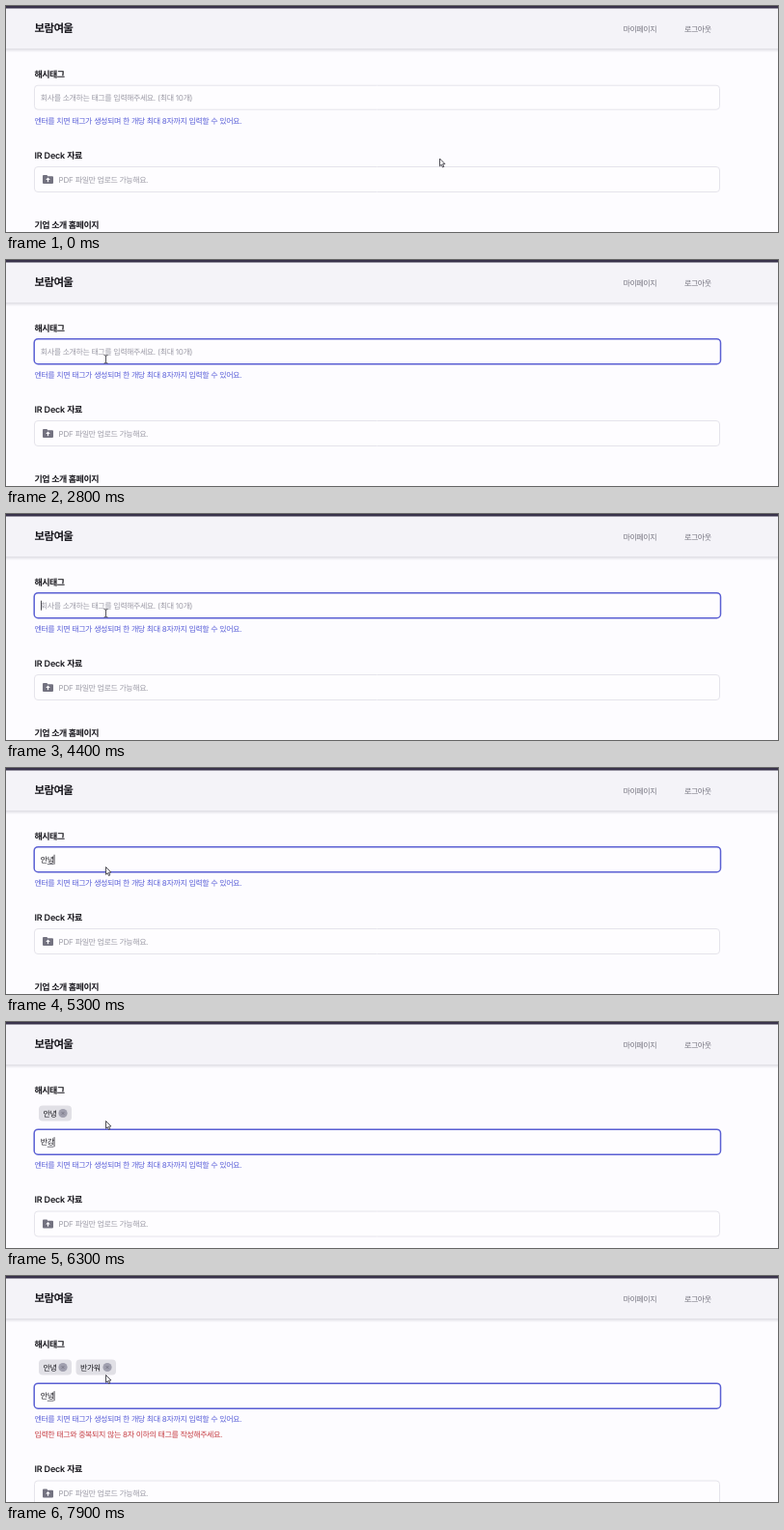
These frames come from a looping animation (800x234 px, 8000 ms). An HTML page with a canvas:

```html
<!DOCTYPE html>
<html lang="ko">
<head>
<meta charset="utf-8">
<style>
html, body { margin: 0; width: 100%; height: 100%; overflow: hidden; background: #fdfcff; }
canvas { display: block; width: 800px; height: 234px; }
</style>
</head>
<body>
<canvas id="stage" width="800" height="234"></canvas>
<script>
const ctx = document.getElementById('stage').getContext('2d');
const LOOP = 8000, STEP = 100;
const FONT = 'Inter, "Noto Sans CJK KR", "Noto Sans CJK", sans-serif';
const COLOR = {
  ink: '#17161c', muted: '#9c9ba6', nav: '#777681', line: '#e5e4eb',
  focus: '#5a5fd3', hint: '#5b60d8', error: '#c63d42', chip: '#e1e0e6'
};
const TAG_SHIFT = 29.5, ERROR_SHIFT = 16;
const FOCUS_AT = 2700, ERROR_AT = 7900;

// Input contents from each time on
const typing = [
  [0, ''], [2900, 'd'], [3000, 'dk'], [3100, 'dks'], [3200, 'dkss'],
  [3300, 'dkssu'], [3400, 'dkssud'], [3600, 'dkssu'], [3800, 'dkss'],
  [3900, 'dks'], [4000, 'dk'], [4100, 'd'], [4400, ''],
  [4600, 'ㅇ'], [4700, '아'], [4900, '안'], [5000, '안ㄴ'], [5100, '안녀'], [5200, '안녕'],
  [5600, ''], [5700, 'ㅂ'], [5900, '바'], [6000, '반'], [6100, '반가'],
  [6300, '반강'], [6400, '반가우'], [6700, '반가워'],
  [7100, 'ㅇ'], [7300, '안'], [7500, '안ㄴ'], [7700, '안녀'], [7800, '안녕']
];
const tags = [
  { at: 5600, label: '안녕', x: 34, w: 34 },
  { at: 7100, label: '반가워', x: 72.5, w: 41.5 }
];
// Pointer moves: start, end, destination
const moves = [
  [0, 800, 408, 118], [900, 1100, 391, 111], [2000, 2700, 103.5, 102.5]
];

// Hangul is set tighter than Latin; returns the x where the text ends
function text(str, x, y, size, color, weight = 400) {
  ctx.font = `${weight} ${size}px ${FONT}`;
  ctx.textRendering = 'geometricPrecision';
  ctx.fillStyle = color;
  for (const run of str.split(/([ㄱ-ㅎ가-힣]+)/).filter(Boolean)) {
    const tracking = /[ㄱ-ㅎ가-힣]/.test(run) ? -0.055 : -0.02;
    ctx.letterSpacing = `${tracking * size}px`;
    ctx.fillText(run, x, y);
    x += ctx.measureText(run).width;
  }
  return x;
}

function box(x, y, w, h, r, fill, stroke, lineWidth = 1) {
  ctx.beginPath();
  ctx.roundRect(x, y, w, h, r);
  if (fill) { ctx.fillStyle = fill; ctx.fill(); }
  if (stroke) { ctx.strokeStyle = stroke; ctx.lineWidth = lineWidth; ctx.stroke(); }
}

function polygon(points) {
  ctx.beginPath();
  points.forEach(([x, y]) => ctx.lineTo(x, y));
  ctx.closePath();
}

function drawHeader() {
  ctx.fillStyle = '#f4f3f8';
  ctx.fillRect(0, 0, 800, 44);
  const shadow = ctx.createLinearGradient(0, 44, 0, 48);
  shadow.addColorStop(0, '#dddce3');
  shadow.addColorStop(1, '#fdfcff');
  ctx.fillStyle = shadow;
  ctx.fillRect(0, 44, 800, 4);
  ctx.fillStyle = '#39334b';
  ctx.fillRect(0, 0, 800, 2.5);
  text('보람여울', 29.5, 27.3, 11.5, COLOR.ink, 600);
  text('마이페이지', 639.5, 26.6, 8, COLOR.nav, 500);
  text('로그아웃', 703, 26.6, 8, COLOR.nav, 500);
}

function drawTag({ label, x, w }) {
  box(x, 86.5, w, 16, 4, COLOR.chip);
  text(label, x + 4.5, 97.6, 8, COLOR.ink, 500);
  const cx = x + w - 9;
  ctx.beginPath();
  ctx.arc(cx, 94.5, 4.6, 0, Math.PI * 2);
  ctx.fillStyle = '#a09fae';
  ctx.fill();
  ctx.strokeStyle = '#6f6e7d';
  ctx.lineWidth = 0.8;
  ctx.beginPath();
  ctx.moveTo(cx - 1.3, 93.2); ctx.lineTo(cx + 1.3, 95.8);
  ctx.moveTo(cx + 1.3, 93.2); ctx.lineTo(cx - 1.3, 95.8);
  ctx.stroke();
}

function drawInput(t, value, y) {
  const focused = t >= FOCUS_AT;
  if (focused) box(29.2, y - 0.3, 711.3, 26, 4, '#fefdff', COLOR.focus, 1.5);
  else box(29.5, y + 0.2, 710, 25, 3.5, '#fefdff', COLOR.line);

  const base = y + 15.7;
  let end = 36;
  if (value) end = text(value, 35.8, base, 8, COLOR.ink);
  else text('회사를 소개하는 태그를 입력해주세요. (최대 10개)', 35.8, base, 8, COLOR.muted);

  if (/[ㄱ-ㅎ가-힣]$/.test(value)) {
    ctx.fillStyle = '#55545e';
    ctx.fillRect(end - 6.9, base + 1.6, 6.6, 0.8);
  }
  if (value || t > 4000) {
    ctx.fillStyle = '#222128';
    ctx.fillRect(end, base - 8, 0.8, 10);
  }
}

function drawFolder(x, y) {
  ctx.fillStyle = '#737280';
  ctx.beginPath();
  ctx.roundRect(x, y, 5, 4, 1);
  ctx.roundRect(x, y + 1.3, 11, 7.7, 1);
  ctx.fill();
  ctx.fillStyle = '#fefdff';
  polygon([[x + 5.5, y + 2.6], [x + 7.8, y + 5], [x + 3.2, y + 5]]);
  ctx.fill();
  ctx.fillRect(x + 4.9, y + 4.6, 1.2, 2.6);
}

function drawFileSection(dy) {
  text('IR Deck 자료', 29.5, 157.8 + dy, 9, COLOR.ink, 600);
  box(29.5, 166.5 + dy, 710, 26, 3.5, '#fefdff', COLOR.line);
  drawFolder(38, 175 + dy);
  text('PDF 파일만 업로드 가능해요.', 54.5, 182.6 + dy, 8, COLOR.muted);
  text('기업 소개 홈페이지', 29.5, 230 + dy, 9, COLOR.ink, 600);
}

function pointerAt(t) {
  let x = 449.5, y = 158;
  for (const [start, end, toX, toY] of moves) {
    const p = Math.min(1, Math.max(0, (t - start) / (end - start)));
    const ease = p * p * (3 - 2 * p);
    x += (toX - x) * ease;
    y += (toY - y) * ease;
  }
  return [x, y];
}

function drawPointer(t) {
  const [x, y] = pointerAt(t);
  if (y < 107 && t < 5000) {
    ctx.strokeStyle = '#45444c';
    ctx.lineWidth = 0.9;
    ctx.beginPath();
    ctx.moveTo(x - 2, y - 4); ctx.lineTo(x, y - 3.4); ctx.lineTo(x + 2, y - 4);
    ctx.moveTo(x, y - 3.4); ctx.lineTo(x, y + 3.9);
    ctx.moveTo(x - 2, y + 4.5); ctx.lineTo(x, y + 3.9); ctx.lineTo(x + 2, y + 4.5);
    ctx.stroke();
    return;
  }
  polygon([[0, 0], [0, 7.8], [1.8, 6.2], [3, 9], [4.3, 8.4], [3.1, 5.7], [5.4, 5.5]]
    .map(([dx, dy]) => [x + dx, y + dy]));
  ctx.fillStyle = '#fff';
  ctx.fill();
  ctx.strokeStyle = '#3d3c45';
  ctx.lineWidth = 0.9;
  ctx.lineJoin = 'round';
  ctx.stroke();
}

function draw(t) {
  const value = typing.filter(([at]) => at <= t).pop()[1];
  const shownTags = tags.filter(tag => tag.at <= t);
  const shift = shownTags.length ? TAG_SHIFT : 0;
  const failed = t >= ERROR_AT;

  ctx.fillStyle = '#fdfcff';
  ctx.fillRect(0, 0, 800, 234);
  drawHeader();
  text('해시태그', 29.5, 74, 9, COLOR.ink, 600);
  shownTags.forEach(drawTag);
  drawInput(t, value, 82 + shift);
  text('엔터를 치면 태그가 생성되며 한 개당 최대 8자까지 입력할 수 있어요.',
    29.5, 121.6 + shift, 8, COLOR.hint);
  if (failed) {
    text('입력한 태그와 중복되지 않는 8자 이하의 태그를 작성해주세요.',
      29.5, 167, 8, COLOR.error);
  }
  drawFileSection(shift + (failed ? ERROR_SHIFT : 0));
  drawPointer(t);
}

const begin = performance.now();
function tick() {
  const t = (performance.now() - begin) % LOOP;
  draw(Math.floor(t / STEP) * STEP);
  requestAnimationFrame(tick);
}
tick();
</script>
</body>
</html>
```
